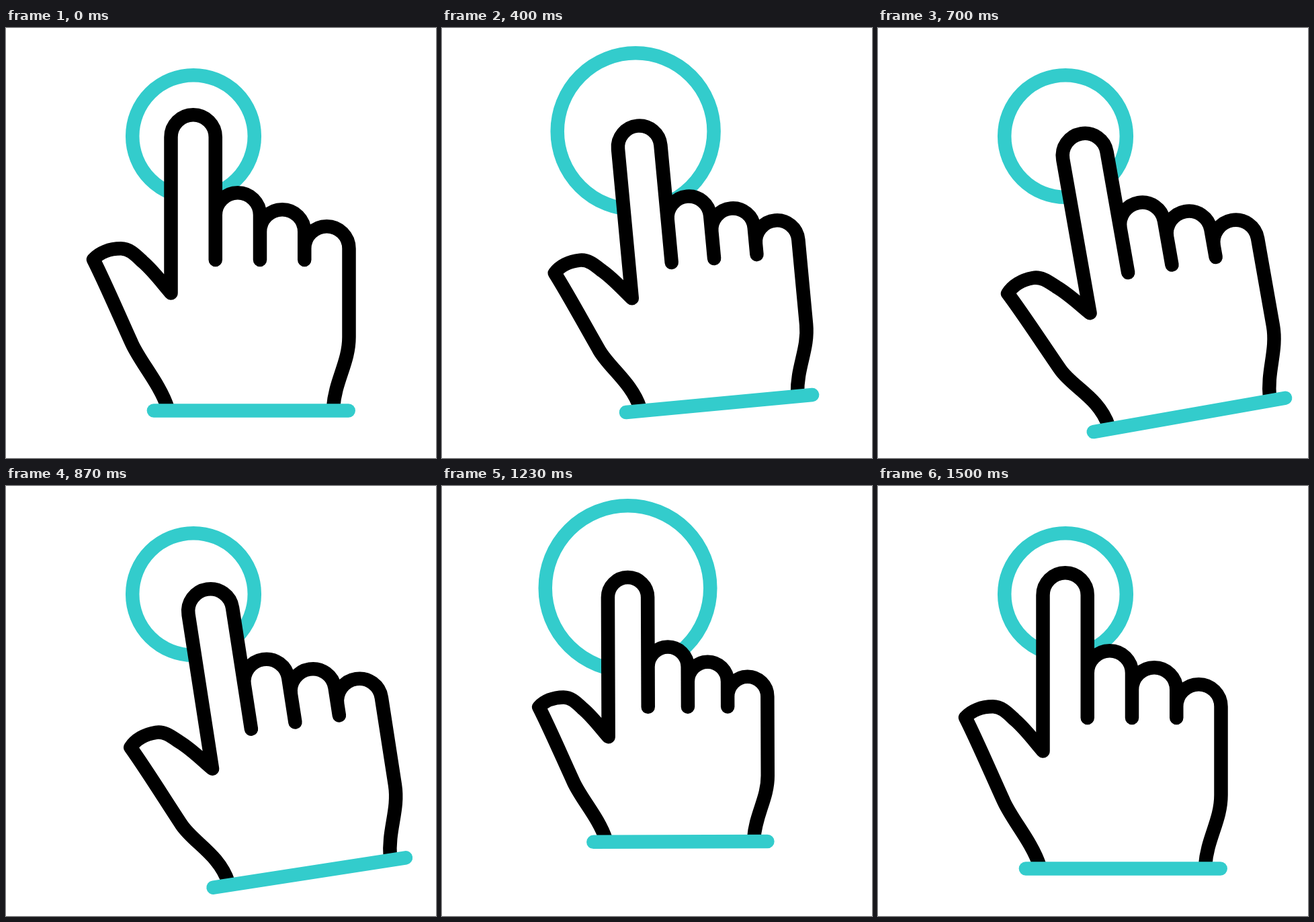
These frames come from a looping animation (640 px wide and 640 px high, 1.67 s). An HTML page with a canvas:

```html
<!DOCTYPE html>
<html lang="en">
<head>
<meta charset="utf-8">
<title>Tap gesture</title>
<style>
  html, body { margin: 0; width: 100%; height: 100%; overflow: hidden; background: #fff; }
  canvas { display: block; width: 640px; height: 640px; }
</style>
</head>
<body>
<canvas id="stage" width="640" height="640"></canvas>
<script>
const ctx = document.getElementById('stage').getContext('2d');
const LOOP = 1670, FPS = 30, LAST = 49;
const TEAL = '#33cccc', BLACK = '#000', WHITE = '#fff';

const KNUCKLE = 'a33.1 33.1 0 0 1 66.25 0';
const FINGERS =
  'C167 425 147 378 130 344.5' +
  'C139 334.5 154 328.3 171 328.3C184 328.3 193 338 203 347.5' +
  'C219 361 232 379 245.5 394.5V162.4' + KNUCKLE +
  'V278.4' + KNUCKLE + 'V303.3' + KNUCKLE + 'V328.3' + KNUCKLE +
  'V460C510.5 498 490 524 487 565' +
  'M311.75 278V345M378 278V345M444.25 303V345';
const cuff = new Path2D('M219.9 569.5H509.7');

const pivot = { x: 320, y: 350 };

function ease(k, from, to) {
  const u = Math.min(1, Math.max(0, (k - from) / (to - from)));
  return u * u * (3 - 2 * u);
}

// Rises from 0 to 1 and falls back again.
const pulse = (k, start, peak, end) => ease(k, start, peak) - ease(k, peak, end);

// The wrist bends more sharply as the hand swings.
const handPath = swing => new Path2D(
  `M${240.5 + 3 * swing} 565C${229 + 8 * swing} ${530 - 9 * swing} 201 499 187.5 470` + FINGERS);

function handMatrix(swing, press) {
  return new DOMMatrix()
    .translate(pivot.x + 61.2 * swing - 67.5 * press, pivot.y + 17.5 * swing - 161 * press)
    .rotate(-10 * swing)
    .scale(1 - press)
    .translate(-pivot.x, -pivot.y);
}

function place(path, matrix) {
  const placed = new Path2D();
  placed.addPath(path, matrix);
  return placed;
}

function stroke(path, color) {
  ctx.strokeStyle = color;
  ctx.stroke(path);
}

function ring(k) {
  const first = pulse(k, 7, 14, 21.1);
  const second = pulse(k, 30, 37.1, 44.3);
  const grow = first + second;
  const path = new Path2D();
  path.arc(279 + 11.4 * first - 2.5 * second, 161 - 9 * grow, 90.8 + 32 * grow, 0, 2 * Math.PI);
  return path;
}

function draw(k) {
  const swing = ease(k, 4, 19.3) - ease(k, 22.6, 38.35);
  const press = 0.151 * (pulse(k, 2, 8, 14) + pulse(k, 29, 34.9, 40.7));
  const matrix = handMatrix(swing, press);
  const outline = place(handPath(swing), matrix);

  ctx.fillStyle = WHITE;
  ctx.fillRect(0, 0, 640, 640);
  ctx.lineWidth = 20.5;
  ctx.lineCap = ctx.lineJoin = 'round';

  stroke(ring(k), TEAL);
  ctx.fill(outline);
  stroke(outline, BLACK);
  stroke(place(cuff, matrix), TEAL);
}

function tick() {
  const time = performance.now() % LOOP;
  // The small lead absorbs step times rounded to 10 ms.
  draw(Math.min(LAST, Math.floor((time + 4) * FPS / 1000)));
  requestAnimationFrame(tick);
}
tick();
</script>
</body>
</html>
```
